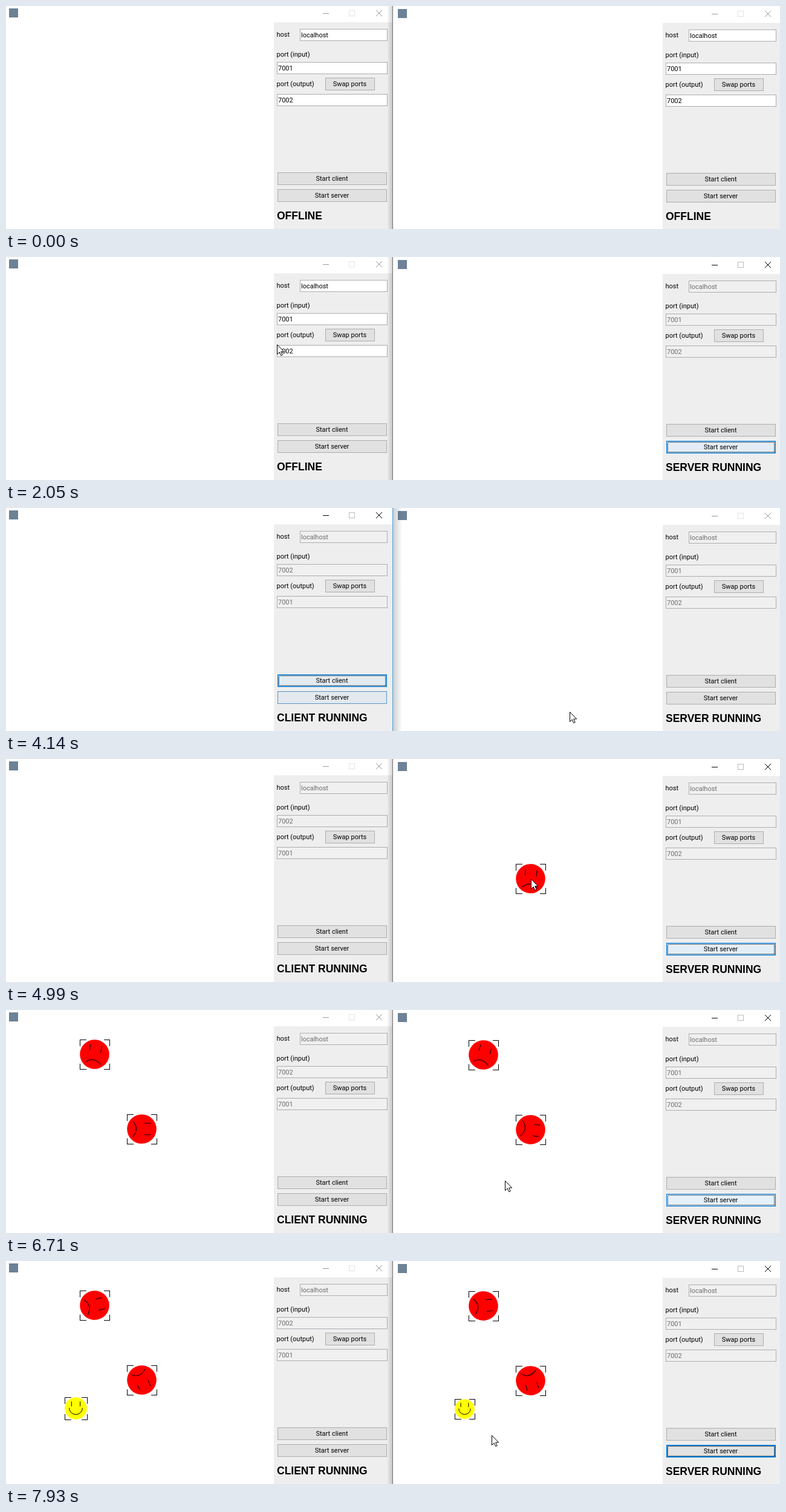
These frames come from a looping animation (1280x370 px, 8000 ms). An HTML page:

```html
<!DOCTYPE html>
<html lang="en">
<head>
<meta charset="utf-8">
<title>Client and server</title>
<style>
html, body { margin: 0; width: 100%; height: 100%; overflow: hidden; background: #fff; }
svg { display: block; width: 1280px; height: 370px; }
text { font: 11px Roboto, "Noto Sans", sans-serif; white-space: pre; }
.status { font: bold 17.5px "Liberation Sans", Arial, sans-serif; }
.crisp { shape-rendering: crispEdges; }
</style>
</head>
<body>
<svg id="stage" viewBox="0 0 1280 370">
  <defs>
    <linearGradient id="toLeft"><stop offset="0" stop-opacity="0"/><stop offset="1" stop-opacity=".17"/></linearGradient>
    <linearGradient id="toRight">
      <stop offset="0" stop-color="#234" stop-opacity=".24"/><stop offset="1" stop-color="#234" stop-opacity="0"/>
    </linearGradient>
  </defs>
</svg>
<script>
const LOOP = 8000;
const SPIN = 0.0545;   // degrees per ms
const SHRINK = 0.0233; // pixels per ms
const stage = document.getElementById('stage');

function add(parent, tag, attrs, content) {
  const node = document.createElementNS('http://www.w3.org/2000/svg', tag);
  set(node, attrs);
  if (content) node.textContent = content;
  parent.appendChild(node);
  return node;
}
function set(node, attrs) {
  for (const key in attrs) node.setAttribute(key, attrs[key]);
}
const clamp = v => Math.max(0, Math.min(1, v));
const mix = (a, b, p) => `rgb(${a.map((v, i) => Math.round(v + (b[i] - v) * p))})`;
const show = (node, on) => set(node, { visibility: on ? 'visible' : 'hidden' });
// Fades in after `on` and out after `off`.
const fade = (t, on, off) => clamp((t - on) / 150) * clamp(1 - (t - off) / 350);

function makeField(g, x, y, w, value) {
  const box = add(g, 'rect', { x: x + .5, y: y + .5, width: w, height: 19, stroke: '#abadb3', class: 'crisp' });
  const text = add(g, 'text', { x: x + 2, y: y + 14 }, value);
  return { box, text };
}

function makeButton(g, x, y, w, label) {
  const rect = (inset, attrs) => add(g, 'rect', {
    x: x + .5 + inset, y: y + .5 + inset, width: w - 2 * inset, height: 20 - 2 * inset,
    fill: 'none', class: 'crisp', ...attrs
  });
  const box = rect(0, {});
  const ring = rect(1, { stroke: '#0078d7' });
  const dots = rect(2, { stroke: '#000', 'stroke-dasharray': '1 1' });
  add(g, 'text', { x: x + w / 2, y: y + 14, 'text-anchor': 'middle' }, label);
  return { box, ring, dots };
}

function makeWindow(x, y) {
  const g = add(stage, 'g', { transform: `translate(${x} ${y})` });
  add(g, 'rect', { x: 5, y: 4, width: 15, height: 15, fill: '#6d8296' });
  add(g, 'rect', { x: 443, y: 27, width: 197, height: 344, fill: '#eee' });
  const minimise = add(g, 'path', { d: 'M524 12.5h10', class: 'crisp' });
  const maximise = add(g, 'rect', { x: 567.5, y: 7.5, width: 9, height: 9, fill: 'none', class: 'crisp' });
  const close = add(g, 'path', { d: 'M612 7l10 10m0-10l-10 10' });
  const label = (ty, content) => add(g, 'text', { x: 447.5, y: ty }, content);
  label(51, 'host');
  label(84, 'port (input)');
  label(133, 'port (output)');
  return {
    g, minimise, maximise, close,
    fields: [
      makeField(g, 486, 38, 144, 'localhost'),
      makeField(g, 448, 93, 182, '7001'),
      makeField(g, 448, 146, 182, '7002')
    ],
    swap: makeButton(g, 528, 119, 81, 'Swap ports'),
    client: makeButton(g, 449, 276, 180, 'Start client'),
    server: makeButton(g, 449, 304, 180, 'Start server'),
    status: add(g, 'text', { x: 448, y: 354, class: 'status' })
  };
}

function makeFace(win, x, y, born, happy) {
  const g = add(win.g, 'g', { transform: `translate(${x} ${y})` });
  const body = add(g, 'g', {});
  add(body, 'circle', { r: 24.3, fill: happy ? '#ff0' : '#f00' });
  const mouth = happy ? 'M-14.5-1A14.5 14.5 0 0 0 14.5-1' : 'M-13 15Q0 3 13 15';
  add(body, 'path', {
    d: 'M-9.5-15V-4.5M9.5-15V-4.5' + mouth,
    fill: 'none', stroke: '#000', 'vector-effect': 'non-scaling-stroke'
  });
  const frame = add(g, 'path', { fill: 'none', stroke: '#000', class: 'crisp' });
  return { g, body, frame, born, happy };
}

const left = makeWindow(0, 0);
const right = makeWindow(643, 1);
const faces = [
  makeFace(left, 225, 198, 5053),
  makeFace(right, 225, 198, 4905),
  makeFace(left, 147, 74, 6530),
  makeFace(right, 147, 74, 6390),
  makeFace(left, 116, 245, 7415, true),
  makeFace(right, 116, 245, 7243, true)
];
const shadowLeft = add(stage, 'rect', { x: 630, width: 9, height: 370, fill: 'url(#toLeft)' });
const shadowRight = add(stage, 'rect', { x: 640, width: 15, height: 370, fill: 'url(#toRight)' });
const edge = add(stage, 'rect', { x: 639, width: 1, height: 370 });
const cursor = add(stage, 'path', {
  d: 'M.5.5V16.5L4.2 13L6.8 18.7L9.2 17.6L6.7 12H11.7Z', fill: '#fff', stroke: '#000'
});

// Pointer stops: time, x, y.
const route = [
  [70, 1160, 360], [300, 1165, 335], [820, 1172, 304], [900, 1172, 304], [1210, 1180, 309],
  [1560, 1180, 309], [1750, 960, 258], [2050, 448, 145], [2130, 458, 146], [2210, 475, 148],
  [2520, 559, 134], [3130, 559, 134], [3550, 562, 284], [3750, 562, 285], [3910, 590, 314],
  [4140, 932, 338], [4300, 925, 320], [4750, 868, 199], [5000, 868, 199], [5600, 893, 296],
  [5750, 893, 298], [6300, 790, 75], [6500, 789, 75], [6710, 825, 283], [7150, 759, 246],
  [7400, 759, 246], [7930, 803, 289]
];

function pointerAt(t) {
  let i = route.findIndex(stop => stop[0] > t);
  if (i < 0) return route[route.length - 1].slice(1);
  if (i === 0) return route[0].slice(1);
  const [t0, x0, y0] = route[i - 1], [t1, x1, y1] = route[i];
  const p = (t - t0) / (t1 - t0);
  return [Math.round(x0 + (x1 - x0) * p), Math.round(y0 + (y1 - y0) * p)];
}

function drawButton(button, { hover = 0, press = 0, focus = false, glow = 0 } = {}) {
  const light = Math.max(hover, focus ? glow : 0);
  const border = focus ? [0, 120, 215] : [173, 173, 173];
  set(button.box, {
    fill: press ? mix([229, 241, 251], [204, 228, 247], press) : mix([225, 225, 225], [229, 241, 251], light),
    stroke: press ? mix([0, 120, 215], [0, 84, 153], press) : mix(border, [0, 120, 215], hover)
  });
  show(button.ring, focus);
  show(button.dots, focus);
  set(button.ring, { 'stroke-opacity': 1 - .8 * Math.max(light, press) });
}

function drawWindow(win, active, enabled, ports, status) {
  const ink = active ? '#000' : '#999';
  set(win.minimise, { stroke: ink });
  set(win.close, { stroke: ink });
  set(win.maximise, { stroke: active ? '#bbb' : '#e4e4e4' });
  win.fields.forEach(({ box, text }, i) => {
    set(box, { fill: enabled ? '#fff' : '#f0f0f0' });
    set(text, { fill: enabled ? '#000' : '#6d6d6d' });
    if (i) text.textContent = ports[i - 1];
  });
  win.status.textContent = status;
}

function drawFace(face, t) {
  const age = t - face.born;
  show(face.g, age >= 0);
  if (age < 0) return;
  const size = face.happy ? Math.round(49 - SHRINK * age) : 49;
  const h = size / 2, arm = 10;
  const turn = face.happy ? 0 : SPIN * age;
  set(face.body, { transform: `translate(-.5 -.5) rotate(${turn}) scale(${size / 49})` });
  set(face.frame, {
    d: [[-1, -1], [1, -1], [1, 1], [-1, 1]]
      .map(([x, y]) => `M${x * (h - arm)} ${y * h}H${x * h}V${y * (h - arm)}`).join('')
  });
}

function draw(t) {
  const leftActive = t >= 2600 && t < 4830;
  const rightActive = (t >= 1440 && t < 2600) || t >= 4830;
  const glow = .5 + .5 * Math.cos((t - 6760) / 2080 * 2 * Math.PI);
  const swapped = t >= 2680, serverOn = t >= 1520, clientOn = t >= 3700;

  drawWindow(left, leftActive, !clientOn, swapped ? ['7002', '7001'] : ['7001', '7002'],
    clientOn ? 'CLIENT RUNNING' : 'OFFLINE');
  drawWindow(right, rightActive, !serverOn, ['7001', '7002'], serverOn ? 'SERVER RUNNING' : 'OFFLINE');

  drawButton(left.swap, {
    hover: fade(t, 2450, 3180),
    press: t < 2600 ? 0 : clamp(1 - (t - 2680) / 700),
    focus: t >= 2600 && t < 3620, glow
  });
  drawButton(left.client, {
    hover: fade(t, 3530, 3860),
    press: t >= 3620 && t < 3720 ? 1 : 0,
    focus: t >= 3620 && t < 4830, glow: .6
  });
  drawButton(left.server, { hover: fade(t, 3840, 3960) });
  drawButton(right.swap);
  drawButton(right.client);
  drawButton(right.server, {
    hover: fade(t, 520, 1600),
    press: t >= 1440 && t < 1520 ? 1 : 0,
    focus: rightActive, glow: t < 2600 ? .75 : glow
  });

  faces.forEach(face => drawFace(face, t));
  show(shadowLeft, !leftActive);
  show(shadowRight, leftActive);
  set(edge, { fill: leftActive ? '#4d9fd3' : '#707070' });
  show(cursor, t >= 70);
  set(cursor, { transform: `translate(${pointerAt(t)})` });
}

const start = performance.now();
function tick() {
  draw((performance.now() - start) % LOOP);
  requestAnimationFrame(tick);
}
tick();
</script>
</body>
</html>
```
